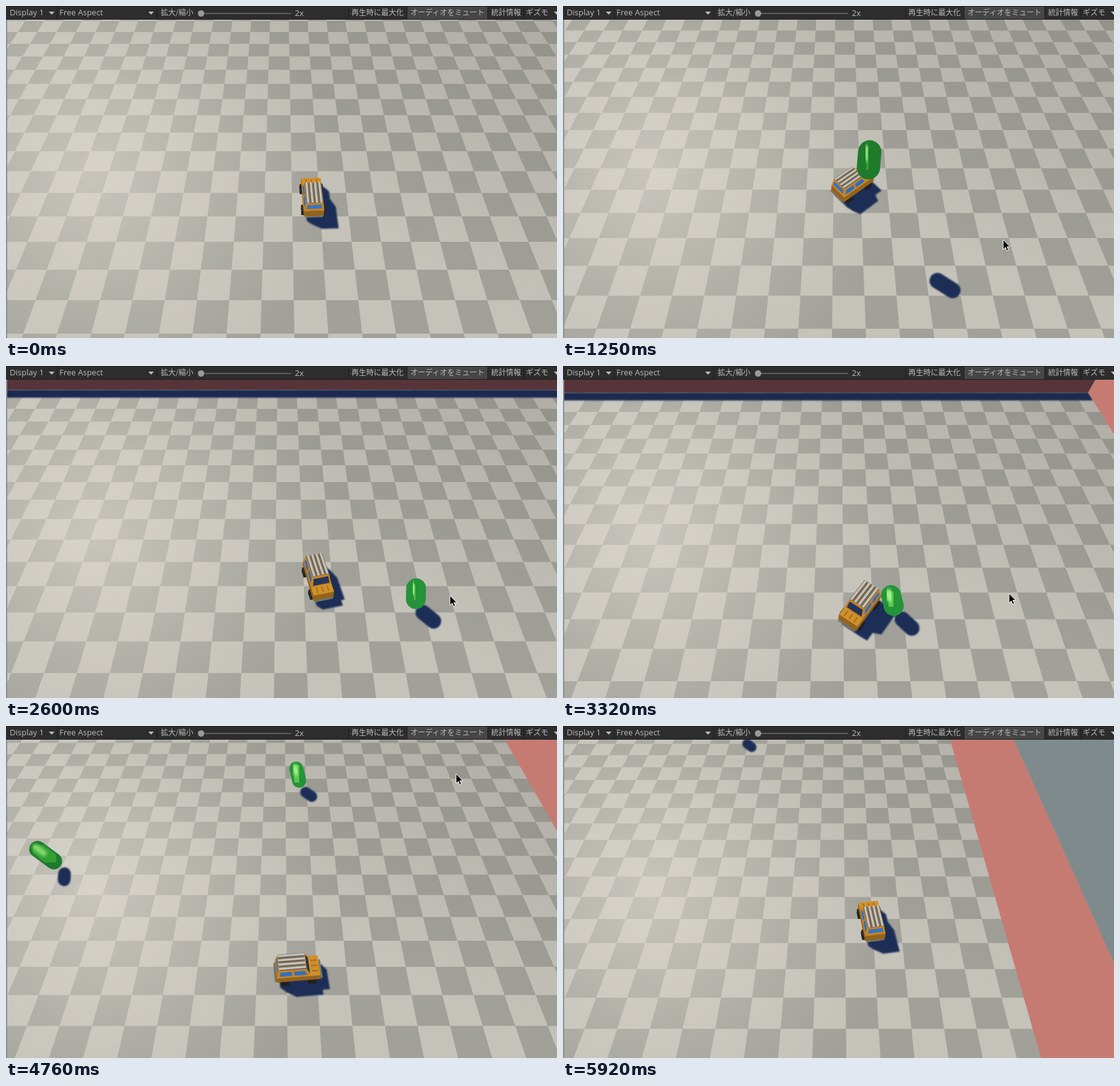
Animation of 887x535 px, one loop 6020 ms. Source, as an HTML page:

```html
<!DOCTYPE html>
<html lang="ja">
<head>
<meta charset="utf-8">
<style>
  html, body { margin: 0; width: 100%; height: 100%; overflow: hidden; background: #282828; }
  svg { display: block; position: absolute; left: 0; top: 0; }
  text { font: 12px "Noto Sans CJK JP", "Noto Sans CJK", sans-serif; fill: #bcbcbc; }
  .latin { font: 13px "Open Sans", "Noto Sans", sans-serif; }
</style>
</head>
<body>
<svg width="887" height="535" viewBox="0 0 887 535">
  <defs>
    <clipPath id="view"><rect x="2" y="22" width="885" height="513"/></clipPath>
    <radialGradient id="glow" gradientUnits="userSpaceOnUse" cx="140" cy="270" r="390">
      <stop offset="0" stop-color="#e6e2d9" stop-opacity=".55"/>
      <stop offset=".4" stop-color="#e0dcd2" stop-opacity=".36"/>
      <stop offset="1" stop-color="#d6d2c8" stop-opacity="0"/>
    </radialGradient>
    <linearGradient id="dim" x1="0" y1="1" x2="1" y2="0">
      <stop offset=".5" stop-color="#55564f" stop-opacity="0"/>
      <stop offset="1" stop-color="#55564f" stop-opacity=".2"/>
    </linearGradient>
    <filter id="soft" x="-20%" y="-20%" width="140%" height="140%"><feGaussianBlur stdDeviation=".8"/></filter>
    <filter id="shine" x="-100%" y="-100%" width="300%" height="300%"><feGaussianBlur stdDeviation="2.5"/></filter>
  </defs>
  <g clip-path="url(#view)">
    <rect y="22" width="887" height="513" fill="#c5c2ba"/>
    <path id="tiles" fill="#a1a199"/>
    <rect y="22" width="887" height="513" fill="url(#glow)"/>
    <rect y="22" width="887" height="513" fill="url(#dim)"/>
    <g id="scene"></g>
  </g>
  <rect y="22" width="2" height="513" fill="#8e8e8c"/>
  <g>
    <rect width="887" height="22" fill="#2d2d2d"/>
    <rect x="646" y="1" width="130" height="20" fill="#464646"/>
    <path d="M0 .5H887M0 21.5H887M82.5 0V22M242.5 0V22M551.5 0V22M645.5 0V22M775.5 0V22M833.5 0V22" stroke="#1c1c1c"/>
    <path d="M69 9h9l-4.500 5zM229 9h9l-4.500 5zM882 9h9l-4.500 5z" fill="#bcbcbc"/>
    <path d="M314 12H459" stroke="#5d5d5d" stroke-width="2"/>
    <circle cx="314" cy="12" r="5.200" fill="#999"/>
    <text class="latin" x="6" y="15">Display 1</text>
    <text class="latin" x="86" y="15">Free Aspect</text>
    <text x="249" y="15">拡大/縮小</text>
    <text class="latin" x="465" y="16">2x</text>
    <text x="556" y="14.500">再生時に最大化</text>
    <text x="651" y="14.500">オーディオをミュート</text>
    <text x="781" y="14.500">統計情報</text>
    <text x="837" y="14.500">ギズモ</text>
  </g>
  <path id="cursor" d="M0 0V15.500L3.600 12.200L6 17.700L8.600 16.600L6.200 11.200H11Z" fill="#000" stroke="#fff"/>
</svg>
<script>
const LOOP = 6020, RAD = Math.PI / 180;
// Camera: pitched pinhole, lengths in floor tiles.
const CX = 444, HORIZON = -606, DEPTH = 22680, SPAN = 1091, EYE = 12.1, TAN = 1.39;
const COL0 = 0.37, WALL_X = 24.08, WALL_Z = 44.6, WALL_H = 4.4;
const SPEED = 4, LAG = 900;
const FALL = { x: -2, y: 8.2, z: 9 };
const NAVY = '#1d2f57', ORANGE = '#c58226';
const byId = id => document.getElementById(id);

// Waypoints of the camera: time, x, z, heading of the car.
const route = [
  [0, 0, 0, 92],
  [1250, 1.57, 6.86, 40],
  [1970, 4.72, 9.02, -35],
  [3320, 11.22, 9.64, -126],
  [4040, 11.31, 5.76, -60],
  [4760, 12.2, 0.18, 5],
  [5920, 18.15, -3.73, 98]
];
// Each capsule drops onto its resting place, leaning over as it lands.
const capsules = [
  { land: 1600, x: 3.1, z: 27.35, leanFrom: 0, leanTo: -.35, tones: ['#1f7a2b', '#33a036', '#86dc70'] },
  { land: 2120, x: 12.93, z: 32.3, leanFrom: .45, leanTo: -.15, tones: ['#25933a', '#5ac848', '#a6f08c'] }
];

let camX = 0, camZ = 0;
const depth = (y, z) => z - camZ - y * TAN;
const project = ([x, y, z]) => {
  const d = depth(y, z);
  return [CX + SPAN * (x - camX) / d, HORIZON + DEPTH * (1 - y / EYE) / d];
};
const onGround = ([x, y, z]) => [x + .7 * y, 0, z - .6 * y];
const path = pts => 'M' + pts.map(p => p[0].toFixed(1) + ' ' + p[1].toFixed(1)).join('L') + 'Z';
const shape = (pts, fill) => `<path d="${path(pts)}" fill="${fill}"/>`;
const area = pts => pts.reduce((sum, p, i) => {
  const q = pts[(i + 1) % pts.length];
  return sum + p[0] * q[1] - q[0] * p[1];
}, 0);
const lerp = (a, b, k) => a + (b - a) * k;
const mix = (a, b, k) => a.map((v, i) => lerp(v, b[i], k));
const ramp = (t, from, to) => Math.max(0, Math.min(1, (t - from) / (to - from)));

function leg(t) {
  let i = 0;
  while (i < route.length - 2 && t >= route[i + 1][0]) i++;
  const a = route[i], b = route[i + 1];
  return { a, b, k: ramp(t, a[0], b[0]) };
}
function headingAt(t) {
  const { a, b, k } = leg((t + LOOP) % LOOP);
  return lerp(a[3], b[3], k) * RAD;
}
function hermite(a, b, va, vb, k) {
  const k2 = k * k, k3 = k2 * k;
  return (2 * k3 - 3 * k2 + 1) * a + (k3 - 2 * k2 + k) * va + (3 * k2 - 2 * k3) * b + (k3 - k2) * vb;
}
function cameraAt(t) {
  const { a, b, k } = leg(t);
  const reach = SPEED * (b[0] - a[0]) / 1000;
  const along = (i, fn) => hermite(a[i], b[i], reach * fn(a[3] * RAD), reach * fn(b[3] * RAD), k);
  return [along(1, Math.cos), along(2, Math.sin)];
}

function floorPath() {
  let d = '';
  for (let r = Math.floor(camZ + 19); r < camZ + 37; r++)
    for (let c = Math.floor(camX - 17); c < camX + 17; c++) {
      if ((r + c) % 2 === 0) continue;
      const x = c + COL0;
      d += path([[x, 0, r], [x + 1, 0, r], [x + 1, 0, r + 1], [x, 0, r + 1]].map(project));
    }
  return d;
}

function walls() {
  const near = camZ + 18;
  const [base, corner, top, topNear] = [[0, near], [0, WALL_Z], [WALL_H, WALL_Z], [WALL_H, near]]
    .map(([y, z]) => project([WALL_X, y, z]));
  const edge = project([WALL_X, 0, WALL_Z - .68]);
  return `<g filter="url(#soft)">${shape([[-9, corner[1]], corner, edge, [-9, edge[1]]], '#1b2b51')}</g>` +
    shape([[-9, top[1]], top, corner, [-9, corner[1]]], '#56343a') +
    shape([base, corner, top, topNear], '#c67b72') +
    shape([top, topNear, [3000, topNear[1]], [3000, top[1]]], '#7f8a8c');
}

function capsule({ land, x, z, leanFrom, leanTo, tones }, t) {
  const left = Math.max(0, land - t) / 1000;
  if (left > .7) return { shade: '', body: '' };
  const mid = [x + FALL.x * left, .75 + FALL.y * left, z + FALL.z * left];
  const axis = [lerp(leanTo, leanFrom, ramp(left, 0, .15)), .62, .06];
  const ends = [-.5, .5].map(s => mid.map((v, i) => v + axis[i] * s));
  const line = (pts, width, color, off = 0) => {
    const [p, q] = pts.map(project);
    return `<path d="M${p[0] - off} ${p[1] - off}L${q[0] - off} ${q[1] - off}" stroke="${color}" stroke-width="${width}" stroke-linecap="round"/>`;
  };
  const size = .64 * SPAN / depth(mid[1], mid[2]);
  return {
    shade: line(ends.map(onGround), .5 * SPAN / depth(0, onGround(mid)[2]), NAVY),
    body: line(ends, size, tones[0]) +
      `<g filter="url(#soft)">${line(ends, size * .8, tones[1], size * .07)}</g>` +
      `<g filter="url(#shine)">${line([mix(...ends, .5), ends[1]], size * .36, tones[2], size * .12)}</g>`
  };
}

function car(t) {
  const heading = headingAt(t), trail = headingAt(t - LAG);
  const c = Math.cos(heading), s = Math.sin(heading), scale = .93;
  // The camera trails behind, so the car sits ahead of it along its recent heading.
  const x = camX + .3 + .95 * Math.cos(trail), z = camZ + 23.9 + 1.35 * Math.sin(trail);
  const place = (a, b, y) => [x + (a * c + b * s) * scale, y * scale, z + (a * s - b * c) * scale];
  const ring = (a0, a1, b, y, mid = 0) =>
    [[a0, -b], [a1, -b], [a1, b], [a0, b]].map(([a, w]) => place(a, w + mid, y));
  const faces = (low, high) => [0, 1, 2, 3]
    .map(i => [low[i], low[(i + 1) % 4], high[(i + 1) % 4], high[i]]).concat([high]);
  const face = (pts, fill) => {
    const flat = pts.map(project);
    return area(flat) > 0 ? shape(flat, fill) : '';
  };
  const box = (low, high, sides, roof = sides) =>
    faces(low, high).map((f, i) => face(f, i < 4 ? sides : roof)).join('');
  const inset = (f, u0, u1, v0, v1) => [[u0, v0], [u1, v0], [u1, v1], [u0, v1]]
    .map(([u, v]) => mix(mix(f[0], f[1], u), mix(f[3], f[2], u), v));

  const chassis = [ring(-.78, .78, .38, .18), ring(-.76, .74, .38, .5)];
  const cabin = [ring(-.76, .4, .37, .5), ring(-.7, .24, .31, .88)];
  let out = '';
  for (const a of [-.48, .48])
    for (const b of [-.38, .38])
      out += box(ring(a - .15, a + .15, .07, 0, b), ring(a - .12, a + .12, .07, .3, b), '#1f2022');
  out += box(ring(-.84, .84, .34, .16), ring(-.84, .84, .34, .26), '#77766f');
  out += box(...chassis, '#94631c', '#d0902a');
  for (const b of [-.2, 0, .2]) out += face(ring(.46, .68, .025, .505, b), '#a87020');
  out += box(...cabin, ORANGE);
  const [leftSide, front, rightSide, rear] = faces(...cabin);
  for (const side of [leftSide, rightSide])
    for (const u of [.08, .54]) out += face(inset(side, u, u + .38, .2, .8), '#2d70c4');
  out += face(inset(front, .08, .92, .12, .85), '#25345a');
  out += face(inset(rear, .1, .9, .3, .85), '#3474c2');
  out += face(ring(-.66, .2, .28, .89), '#8f7145');
  for (let b = -.24; b < .3; b += .16) {
    out += face(ring(-.69, .23, .06, .92, b), '#53514e');
    out += face(ring(-.69, .23, .042, .94, b), '#c4c2bc');
  }

  const shade = [chassis, cabin].flatMap(([low, high]) => faces(low, high)).map(f => {
    const flat = f.map(p => project(onGround(p)));
    return path(area(flat) < 0 ? flat.reverse() : flat);
  }).join('');
  return { shade: `<path d="${shade}" fill="${NAVY}"/>`, body: out };
}

// The pointer drifts slowly, slips up over the toolbar, comes back and leaves again.
function pointerAt(t) {
  const x = 703 + .0045 * t + 190 * (1 - ramp(t, 620, 980));
  const y = t < 4200
    ? lerp(383 - .005 * t, -25, ramp(t, 3750, 3950))
    : lerp(-25, 77, ramp(t, 4400, 4580) - ramp(t, 5660, 5800));
  return [x, y];
}

function render(t) {
  [camX, camZ] = cameraAt(t);
  byId('tiles').setAttribute('d', floorPath());
  const parts = [car(t), ...capsules.map(item => capsule(item, t))];
  byId('scene').innerHTML = walls() +
    `<g filter="url(#soft)">${parts.map(p => p.shade).join('')}</g>` + parts.map(p => p.body).join('');
  byId('cursor').setAttribute('transform', `translate(${pointerAt(t)})`);
}

// The picture advances in steps of about 90 ms.
function stepTime(t) {
  if (t >= 5920) return 5920;
  const shift = t < 620 ? 0 : 10;
  return Math.floor((t + shift) / 90) * 90 - shift;
}
let shown = -1;
const start = performance.now();
function tick() {
  const t = stepTime((performance.now() - start) % LOOP);
  if (t !== shown) render(shown = t);
  requestAnimationFrame(tick);
}
tick();
</script>
</body>
</html>
```
